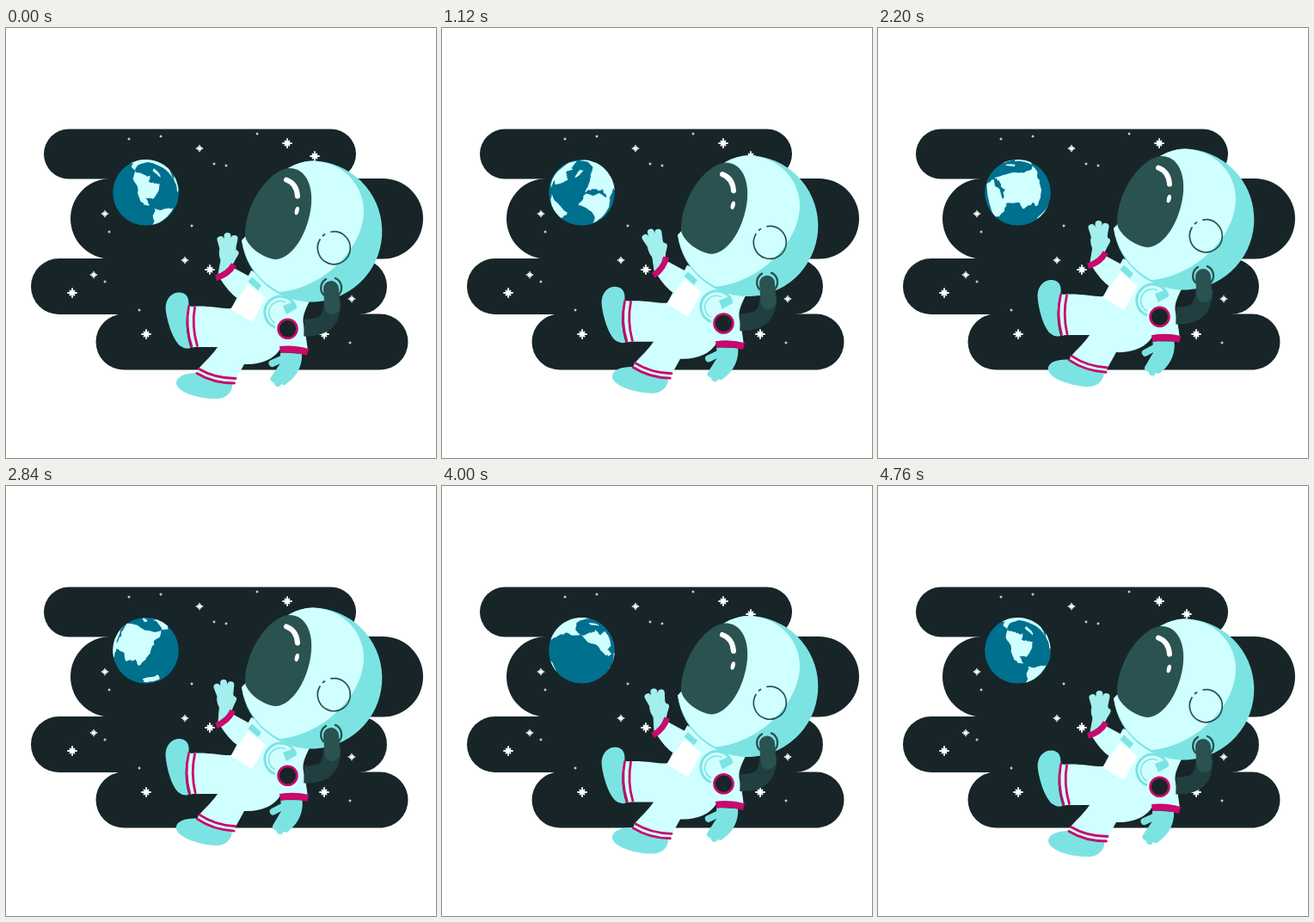
These frames come from a looping animation (500x500 px, 4800 ms). An HTML page:

```html
<!DOCTYPE html>
<html lang="en">
<head>
<meta charset="utf-8">
<title>Floating astronaut</title>
<style>
  html, body { margin: 0; width: 100%; height: 100%; overflow: hidden; background: #fff; }
  svg { display: block; width: 100vw; height: 100vh; }
  .night { fill: #172528; }
  .light { fill: #d0ffff; }
  .mid { fill: #7ce3e3; }
  .glove { fill: #a2efee; stroke: #a2efee; }
  .visor { fill: #2a5251; }
  .line { fill: none; stroke-linecap: round; }
  .flat { fill: none; stroke-linecap: butt; }
  .pink { stroke: #c9096b; }
  .cyan { stroke: #7ce3e3; }
  .dark { stroke: #2a5251; }
  .shade { stroke: #213f40; }
  .white { stroke: #fff; }
  .pale { stroke: #d0ffff; }
</style>
</head>
<body>
<svg viewBox="0 0 500 500">
  <g class="night">
    <rect x="44" y="117.500" width="363" height="58" rx="29"/>
    <rect x="75" y="175" width="410" height="93.500" rx="46.700"/>
    <rect x="29" y="268" width="414" height="65" rx="32.500"/>
    <rect x="104.500" y="332.500" width="363" height="65" rx="32.500"/>
  </g>
  <g id="stars" class="line white"></g>

  <circle cx="162.500" cy="191.300" r="38.300" fill="#00708f"/>
  <path id="land" class="light" transform="translate(162.500 191.300) rotate(6) scale(38.300)"/>

  <g id="astronaut">
    <!-- arm, torso and legs -->
    <path class="light" d="M248 290L263 278L300 298L280 328L270 315Q259 308 248 290Z"/>
    <path class="light" d="M285 282L356 312C348 327 344 335 346 345C349 359 350 366 351 376L319 373C312 385 296 392 277 391L266 411Q240 410 223 397C232 387 240 380 246 371H217Q210 346 215 324C234 322 252 327 262 326Z"/>
    <g id="kick">
      <path class="mid" d="M203 307C212 308 214 316 212 325Q205 346 212 372Q206 374 200 369C191 360 186 337 185.500 325C186 313 194 306 203 307Z"/>
      <path class="flat pale" stroke-width="6" d="M216 324Q210 347 217 371"/>
      <path class="line pink" stroke-width="2.800" d="M212.500 324Q207 347 213.500 370.500M219.500 325Q214.500 347 220 370"/>
    </g>
    <g id="step">
      <path class="mid" d="M222 401C209 401 198 405 198 413C199 424 226 432 247 431C258 430 264 421 263 414Q240 412 222 401Z"/>
      <path class="flat pale" stroke-width="6" d="M223 399Q242 410 266 410.500"/>
      <path class="line pink" stroke-width="2.800" d="M224.500 396.500Q243 407.500 267 407.500M222 401.500Q241 413 265.500 413"/>
    </g>

    <!-- chest -->
    <path fill="#fff" d="M282 298L302 314L286 342L261 327Z"/>
    <path class="mid" d="M286 289.500L297 299.500L293 305L281.500 295Z"/>
    <path class="flat cyan" stroke-width="3" d="M313 348A18.500 18.500 0 1 1 337 325"/>
    <path class="flat cyan" stroke-width="1.500" d="M313 343A13 13 0 0 1 325 319"/>
    <path class="mid" d="M322 323L335 318L338 326L326 333Z"/>

    <g id="wave">
      <path class="glove" stroke="none" d="M247 286L250 270C247 262 248 256 252 252H266C269 262 266 271 262 277Z"/>
      <path class="line" stroke="#a2efee" stroke-width="8" d="M249.500 246L254 262M257.500 242V262M265.500 245L262 262M261 271L266.500 262"/>
      <path class="flat pink" stroke-width="7" d="M244 290.500Q258 287 265 275"/>
    </g>
    <g id="drop">
      <path class="mid" d="M319 377L344 379C345 394 336 408 325 414L311 407L319 392Z"/>
      <path class="line cyan" stroke-width="8" d="M309.500 390L323 384M311.500 408L321 394M316 413L326 398M323 411L333 396"/>
      <path class="flat pink" stroke-width="8" d="M318.500 374Q335 372 351 377"/>
    </g>

    <!-- helmet -->
    <path class="mid" d="M328 163Q342 154.500 357 154.500A82 82 0 1 1 274 247L300 220Z"/>
    <path class="light" d="M328 163Q342 154.500 357 154.500C393 156 416 184 416 212C416 257 368 303 318 307A82 82 0 0 1 274 247L300 220Z"/>
    <path class="visor" d="M328 163C349 162 357 184 355 205C352 238 333 268 314 269C298 268 278 252 278 240C278 205 305 166 328 163Z"/>
    <path class="line white" stroke-width="6" d="M326 176.500Q338 181 339 195.500"/>
    <ellipse cx="338.300" cy="212.500" rx="2.400" ry="4.800" fill="#fff" transform="rotate(14 338.300 212.500)"/>
    <path class="line dark" stroke-width="1.700" d="M378 237A19 19 0 1 1 365 246M368.500 241.500L370.500 240"/>

    <!-- air hose -->
    <path class="flat shade" stroke-width="20" d="M379.500 318C379 341 370 349 346.500 348.500"/>
    <path class="line dark" stroke-width="18" d="M378 303L379.500 324"/>
    <path class="line dark" stroke-width="2.400" d="M369 310A12 12 0 0 1 372 292M383 291A12 12 0 0 1 387 310"/>

    <circle class="night pink" cx="327.500" cy="349.800" r="11" stroke-width="2.600"/>
  </g>
</svg>

<script>
const LOOP = 4800;
const TAU = Math.PI * 2;
const RAD = Math.PI / 180;
const byId = id => document.getElementById(id);
const pairs = text => text.split(" ").map(pair => pair.split(",").map(Number));

// Sky: star places grouped by size.
function sparkle(x, y, r) {
  const d = r * 0.5;
  return `<path stroke-width="${r * 0.36}" d="M${x - r} ${y}H${x + r}M${x} ${y - r}V${y + r}` +
    `M${x - d} ${y - d}L${x + d} ${y + d}M${x - d} ${y + d}L${x + d} ${y - d}"/>`;
}

const sky = {
  5: "327,134 237,281 77,308 163,356 359,149 370,356",
  3.7: "225,140 115,216 208,270 102,287 402,315",
  1.5: "143,129 180,126 292,123 242,158 256,160 120,237 216,230 115,295 155,328 400,366"
};
byId("stars").innerHTML = Object.entries(sky).flatMap(([r, places]) =>
  pairs(places).map(([x, y]) => sparkle(x, y, +r))).join("");

// Globe: a few longitude,latitude corners per continent; seeded noise roughens the coasts.
let seed = 7;
const noise = () => (seed = (seed * 16807) % 2147483647) / 2147483647 - 0.5;

function roughen(corners) {
  return corners.flatMap(([x, y], i) => {
    const [u, v] = corners[(i + 1) % corners.length];
    return [0, 0.2, 0.4, 0.6, 0.8].map(k =>
      [x + (u - x) * k + 4 * noise(), y + (v - y) * k + 4 * noise()]);
  });
}

const coasts = [
  "-165,65 -125,70 -85,68 -92,58 -78,55 -58,52 -80,28 -97,28 -86,12 -106,22 -125,48",
  "-55,80 -20,78 -44,60",
  "-78,8 -35,-7 -55,-36 -70,-54 -81,-5",
  "-17,15 -6,35 32,31 51,11 35,-24 20,-35 9,4",
  "-9,38 8,57 25,71 105,77 188,66 137,54 122,30 105,9 97,18 79,8 70,22 45,13 36,36 12,45",
  "114,-22 142,-11 153,-30 118,-35"
].map(text => roughen(pairs(text)));

const tiltSin = Math.sin(38 * RAD);
const tiltCos = Math.cos(38 * RAD);

// Orthographic view; hidden points slide onto the rim.
function project([lon, lat], center) {
  const a = (lon - center) * RAD;
  const s = Math.sin(lat * RAD);
  const c = Math.cos(lat * RAD);
  const x = c * Math.sin(a);
  const y = tiltSin * c * Math.cos(a) - tiltCos * s;
  const front = tiltSin * s + tiltCos * c * Math.cos(a) > 0;
  const k = front ? 1 : 1 / Math.hypot(x, y);
  return { x: x * k, y: y * k, front };
}

function landPath(center) {
  return coasts.map(coast => {
    const points = coast.map(p => project(p, center));
    if (!points.some(p => p.front)) return "";
    return "M" + points.map(p => p.x.toFixed(3) + " " + p.y.toFixed(3)).join("L") + "Z";
  }).join("");
}

const swing = turns => (1 - Math.cos(TAU * turns)) / 2;
const move = (id, value) => byId(id).setAttribute("transform", value);
const start = performance.now();

function draw(now) {
  const t = (Math.max(0, now - start) % LOOP) / LOOP;
  const slow = swing(t);
  byId("land").setAttribute("d", landPath(-98 + 360 * t));
  move("astronaut", `translate(0 ${-14.2 * slow})`);
  move("wave", `rotate(${-19 * swing(2 * t)} 256 287)`);
  move("drop", `rotate(${-4 * slow} 335 372)`);
  move("kick", `rotate(${-3 * (1 - slow)} 212 324)`);
  move("step", `rotate(${3.5 * slow} 245 407)`);
  requestAnimationFrame(draw);
}
draw(start);
</script>
</body>
</html>
```
